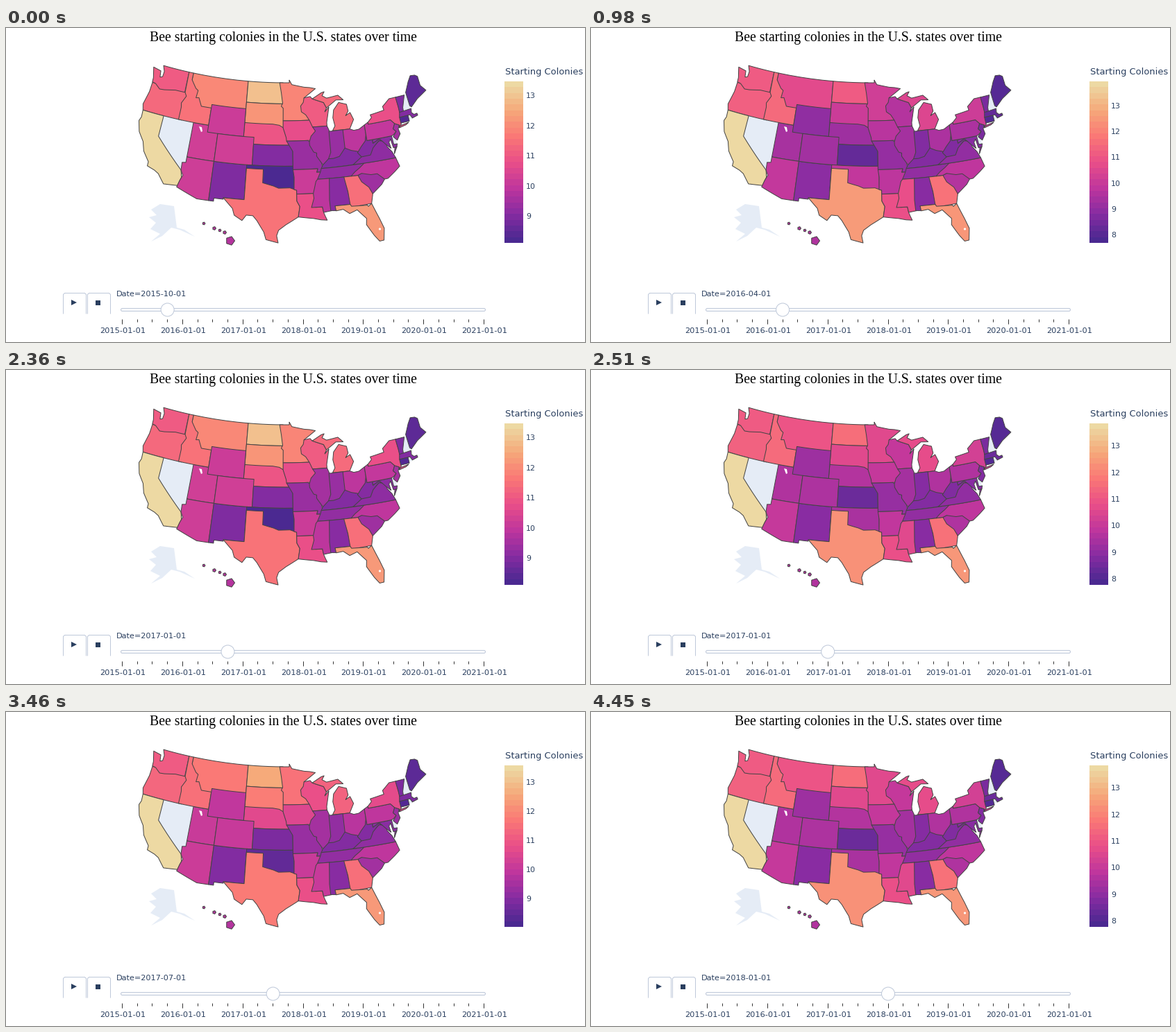
Animation of 834x453 px, one loop 4730 ms. Source, as a matplotlib script:

```python
import math

import matplotlib.pyplot as plt
import numpy as np
from matplotlib.animation import FuncAnimation
from matplotlib.collections import PolyCollection
from matplotlib.colors import LinearSegmentedColormap
from matplotlib.patches import Circle, FancyBboxPatch, Polygon

W, H, DPI = 834, 453, 72
LOOP_MS, STEP_MS = 4730, 22
MAP_TIMES = (0, 400, 980, 1410, 1990, 2510, 2910, 3460, 3890, 4450)
LABEL_TIMES = (0, 400, 830, 1410, 1840, 2360, 2910, 3340, 3890, 4450)
FIRST_QUARTER = 3  # 2015-10, counted from 2015-01
INK, BORDER, LAND = "#2a3f5f", "#bec8d9", "#e5ecf6"
SUNSET = LinearSegmentedColormap.from_list("sunset", [
    (r / 255, g / 255, b / 255) for r, g, b in (
        (75, 41, 145), (135, 44, 162), (192, 54, 157), (234, 79, 136),
        (250, 120, 118), (246, 169, 122), (237, 217, 163))])


def spring_share(quarter):
    """Yearly cycle, about 1 in spring and 0 in autumn, peaking in March."""
    return 0.5 + 0.7 * math.cos(math.pi / 2 * (quarter - 2 / 3))


def albers(lon_west, lat):
    """Conic equal-area projection to stage pixels."""
    s1, s2 = math.sin(math.radians(29.5)), math.sin(math.radians(45.5))
    n = (s1 + s2) / 2
    rho = np.sqrt(1 + s1 * s2 - 2 * n * np.sin(np.radians(lat))) / n
    theta = n * np.radians(96 - lon_west)
    return np.column_stack((402.4 + 573 * rho * np.sin(theta),
                            -552.4 + 573 * rho * np.cos(theta)))


def outline(*points):
    """Projected ring whose edges follow the parallels."""
    ring = np.array(points + points[:1], float)
    at = np.arange(0, len(ring) - 0.99, 0.2)
    corners = np.arange(len(ring))
    return albers(*(np.interp(at, corners, axis) for axis in ring.T))


def box(west, east, north, south):
    return (west, north), (east, north), (east, south), (west, south)


shapes, autumn, spring = [], [], []


def add_shape(levels, shape):
    shapes.append(shape)
    autumn.append(levels[0] / 100)
    spring.append(levels[1] / 100)


def state(in_autumn, in_spring, *points):
    add_shape((in_autumn, in_spring), outline(*points))


# Each state overlaps the ones before it, so most borders are given only once.
# Points are degrees west and north.

# West
state(60, 57, (124, 46.2), (119, 46.2), (116.4, 46), (116.4, 42), (124.2, 42),
      (124.55, 42.85), (124.05, 44.8))
state(55, 55, (124.7, 48.38), (123, 48.15), (122.8, 47.25), (122.3, 47.4), (122.25, 48.2),
      (122.75, 49), (117.03, 49), (117, 46), (118.98, 46), (121.2, 45.65), (122.2, 45.57),
      (123.3, 46.17), (124.05, 46.27), (124.1, 46.9))
state(100, 100, (124.2, 42), (120, 42), (120, 39), (114.63, 35), (114.3, 34),
      (114.72, 32.72), (117.12, 32.53), (118.4, 33.8), (119.2, 34.15), (120.6, 34.5),
      (120.6, 35.1), (121.9, 36.4), (122.5, 37.7), (123.7, 38.9), (124.35, 40.4), (124.1, 41))
state(70, 49, *box(116.05, 104.05, 49, 44.4))
state(38, 27, *box(114.04, 109.05, 42, 37))
state(64, 61, (117.03, 49), (116.05, 49), (116.05, 48), (114.9, 46.9), (114.35, 46.65),
      (114.5, 45.56), (113.9, 45.65), (113.1, 44.5), (111.05, 44.5), (111.05, 42),
      (117.03, 42), (117.03, 43.8), (117.2, 44.4), (116.5, 45.5), (116.92, 46))
state(38, 35, (114.04, 37), (109.05, 37), (109.05, 31.33), (111.07, 31.33), (114.8, 32.5),
      (114.5, 33.5), (114.14, 34.3), (114.63, 35), (114.7, 36.1), (114.04, 36.2))
state(15, 18, (109.05, 37), (103.04, 37), (103.04, 32), (106.6, 32), (106.6, 31.78),
      (108.2, 31.78), (108.2, 31.33), (109.05, 31.33))

# Plains
state(88, 58, *box(104.05, 96.5, 49, 45.94))
state(73, 41, *box(104.05, 96.4, 45.94, 42.5))
state(50, 26, (104.05, 43), (98.5, 43), (97.2, 42.85), (96.4, 42.5), (95.3, 40), (104.05, 40))
state(36, 21, *box(111.05, 104.05, 45, 41))
state(38, 26, *box(109.05, 102.05, 41, 37))
state(15, 8, *box(102.05, 94.61, 40, 37))
state(2, 31, *box(103.04, 94.43, 37, 33.64))
state(66, 77, (103.04, 36.5), (100, 36.5), (100, 34.56), (98.1, 34.15), (97.2, 33.85),
      (95.2, 33.9), (94.04, 33.55), (94.04, 32), (93.55, 31.2), (93.85, 29.7), (95.9, 28.6),
      (97.1, 27.8), (97.4, 27), (97.15, 25.96), (99.1, 26.4), (99.5, 27.5), (100.7, 29.1),
      (101.4, 29.77), (102.5, 29.8), (103.15, 28.98), (104.5, 29.65), (104.9, 30.6),
      (106.62, 32), (103.04, 32))

# Along the Mississippi
state(68, 42, (97.23, 49), (95.15, 49), (95.15, 49.38), (94.6, 48.72), (92, 48.3),
      (90.8, 48.2), (89.6, 48), (92.1, 46.75), (91.1, 43.5), (96.45, 43.5), (96.45, 45.3),
      (96.85, 45.6), (96.56, 46), (96.85, 47.5))
state(47, 33, (96.45, 43.5), (90.5, 43.5), (90, 41.5), (91, 40.6), (95.77, 40.59),
      (95.85, 41.1), (96.45, 42.49))
state(22, 21, (95.77, 40.59), (91.73, 40.61), (90.5, 40), (89.5, 38.5), (89.2, 36),
      (90.37, 36), (90.15, 36.5), (94.62, 36.5), (94.61, 39.1), (95.3, 40))
state(37, 33, (94.62, 36.5), (90.15, 36.5), (90.37, 36), (89.5, 36), (91, 33), (94.04, 33),
      (94.04, 33.55), (94.48, 33.64), (94.43, 35.4))
state(50, 50, (94.04, 33), (90.9, 33), (90.9, 31), (89.75, 31), (89.6, 30.2), (89.4, 29.7),
      (89.1, 29.05), (90.1, 29.15), (91.3, 29.4), (93.85, 29.7), (93.55, 31.2), (94.04, 32))
state(53, 32, (92.1, 46.75), (90.8, 46.9), (90.4, 46.55), (88.1, 45.9), (87.6, 45.1),
      (88, 44.55), (87.1, 45.2), (87.8, 43), (87.8, 42.5), (90.65, 42.5), (91.22, 43.5),
      (91.9, 44.3), (92.75, 44.75), (92.85, 45.6), (92.29, 46.1))
state(25, 25, (90.65, 42.5), (87.8, 42.5), (87.4, 41.7), (87.5, 38.2), (88, 37.3),
      (89.15, 37), (90.2, 38.3), (90.15, 38.75), (90.7, 38.9), (91.4, 39.9),
      (91.42, 40.38), (91.05, 41.2), (90.15, 41.9))

# Great Lakes and Ohio valley
state(60, 46, (90.4, 46.55), (88.4, 47.35), (87.8, 47.45), (88.3, 46.9), (87.4, 46.5),
      (85, 46.75), (84, 46), (85.5, 46.1), (87.6, 45.1), (88.1, 45.9))
state(60, 46, (86.8, 41.76), (86.25, 42.4), (86.5, 43.6), (86.2, 44.7), (85, 45.7),
      (83.45, 45.3), (83.3, 44.3), (83.9, 43.7), (82.95, 44.05), (82.45, 43), (83.45, 41.72))
state(21, 16, (87.53, 41.7), (84.7, 41.74), (84.7, 38.9), (86, 37.7), (88.05, 37.8),
      (87.53, 38.7))
state(32, 28, (84.81, 41.72), (83.45, 41.72), (82.7, 41.45), (81.7, 41.5), (80.52, 41.98),
      (80.52, 39.8), (82, 38.2), (84.81, 38.8))
state(16, 16, (89.15, 37), (88.05, 37.8), (87.1, 37.8), (86, 38), (84.82, 39.1),
      (83.7, 38.65), (82.6, 38.4), (81.9, 37.4), (83.5, 36.6), (89.5, 36.5))

# South
state(20, 20, (89.5, 36.5), (81.68, 36.59), (84, 35), (90.3, 35), (89.7, 36))
state(34, 48, (90.3, 35), (88.1, 35), (88.3, 30.35), (89.6, 30.2), (89.75, 31), (91.6, 31),
      (91.1, 32.3), (91.17, 33), (90.6, 34.7))
state(17, 17, (88.2, 35), (85.5, 35), (84.9, 31), (87.6, 31), (87.45, 30.3), (88.4, 30.37),
      (88.47, 31.9))
state(63, 64, (85.6, 35), (83, 35), (81.3, 33.1), (81, 32.08), (81.45, 30.72),
      (84.86, 30.6), (85.05, 31), (85.18, 32.87))
state(78, 77, (87.6, 31), (85.05, 31), (84.86, 30.71), (82.2, 30.57), (82.05, 30.38),
      (81.45, 30.72), (80.55, 28.4), (80.05, 26.9), (80.4, 25.2), (81.1, 25.15),
      (81.8, 26.1), (82.8, 27.8), (82.65, 28.7), (84, 30.1), (85.3, 29.7), (86.3, 30.4),
      (87.5, 30.28))
state(24, 29, (83.1, 35), (82.4, 35.2), (79.67, 35.2), (78.55, 33.86), (79.2, 33.2),
      (81, 32.08), (81.5, 33.1), (82.6, 34))
state(33, 33, (84.32, 35), (83.5, 35.57), (82.6, 36.03), (81.68, 36.59), (75.87, 36.55),
      (75.5, 35.25), (76.5, 34.65), (77.95, 33.87), (78.55, 33.86), (79.67, 34.8),
      (80.8, 34.82), (82.4, 35.2), (83.1, 35))
state(19, 20, (83.68, 36.6), (75.87, 36.55), (76.3, 37.5), (77, 38.35), (77.05, 38.85),
      (77.75, 39.3), (78.2, 39.4), (80, 38.5), (81.5, 37.6), (81.97, 37.54))
state(19, 20, (75.95, 37.15), (75.25, 38.03), (75.65, 37.95))
state(16, 15, (80.52, 40.63), (80.52, 39.72), (79.48, 39.72), (79.48, 39.2), (78.2, 39.65),
      (77.75, 39.3), (78.35, 39.4), (79.6, 38.55), (80.3, 37.6), (81.97, 37.54),
      (82.6, 38.2), (81.75, 39), (80.85, 39.7))
state(18, 17, (79.48, 39.72), (75.79, 39.72), (75.7, 38.46), (75.05, 38.45), (75.25, 38.03),
      (75.9, 38), (76.1, 39.3), (76.5, 38.9), (76.35, 38), (77.05, 38.6), (77.75, 39.3),
      (78.2, 39.65), (79.48, 39.2))

# Northeast
state(34, 28, (80.52, 41.98), (79.76, 42.27), (79.76, 42), (75.35, 42), (74.7, 41.35),
      (75.2, 40.65), (74.75, 40.2), (75.4, 39.8), (75.79, 39.72), (80.52, 39.72))
state(24, 14, (74.7, 41.35), (73.9, 41), (74.25, 40.5), (74.1, 39.75), (74.9, 38.95),
      (75.5, 39.55), (74.75, 40.2), (75.2, 40.65))
state(49, 39, (79.76, 42.27), (78.9, 42.85), (79.05, 43.27), (76.2, 43.55), (76.3, 44.1),
      (74.7, 45), (73.3, 45), (73.2, 42.7), (73.5, 41), (73.95, 40.75), (73.9, 41),
      (74.7, 41.35), (75.35, 42), (79.76, 42))
state(49, 39, (74, 40.6), (73.7, 40.87), (72, 41.05), (72.6, 40.8))
state(14, 13, (73.35, 45), (71.5, 45), (72.4, 43.3), (72.46, 42.73), (73.27, 42.75),
      (73.25, 43.5))
state(15, 8, (73.5, 42.04), (73.27, 42.75), (70.85, 42.87), (71, 42.3), (70.6, 41.95),
      (70, 42), (69.95, 41.7), (71.1, 41.5), (71.38, 42.04))
state(2, 2, *box(73.5, 71.8, 42.04, 41.2))
state(5, 3, (71.08, 45.3), (70, 46.7), (69.23, 47.46), (68.3, 47.36), (67.8, 47.07),
      (67.8, 45.7), (66.97, 44.8), (69.1, 44), (70.7, 43.07), (70.98, 43.3))

# Hawaii: small islands in stage pixels
turn = np.linspace(0, 2 * np.pi, 6)
for x, y, radius in ((285, 282, 2), (300, 289, 2.5), (308, 292, 2), (315, 295, 2.5),
                     (323, 307, 6.5)):
    add_shape((30, 29), np.column_stack((x + radius * np.cos(turn), y + radius * np.sin(turn))))

# Land without data: Nevada, New Hampshire, Delaware, Rhode Island, Alaska
bare_land = [outline(*box(*edges)) for edges in (
    (120, 114.04, 42, 35.2), (72.4, 70.9, 45, 42.8), (75.79, 75.1, 39.8, 38.45),
    (71.86, 71.2, 42, 41.4))]
bare_land.append([(222, 254), (242, 257), (246, 288), (257, 291), (272, 301), (250, 291),
                  (238, 288), (225, 300), (209, 308), (222, 297), (208, 290), (216, 281),
                  (206, 273), (217, 270), (209, 262)])

fig = plt.figure(figsize=(W / DPI, H / DPI), dpi=DPI, facecolor="white")
ax = fig.add_axes([0, 0, 1, 1])
ax.axis("off")


def label(x, y, text, size=11, font="DejaVu Sans", color=INK, ha="left"):
    return ax.text(x, y, text, size=size, family=font, color=color, ha=ha, va="baseline")


def flat(points, color, zorder=1):
    ax.add_patch(Polygon(points, fc=color, ec="none", zorder=zorder))


label(399, 19, "Bee starting colonies in the U.S. states over time", 19.7,
      "Liberation Serif", "black", "center")

# Map
ax.add_collection(PolyCollection(bare_land, facecolor=LAND, edgecolor="none"))
states = PolyCollection(shapes, edgecolor="#444444", linewidth=1, zorder=2)
ax.add_collection(states)
flat([(278, 142), (282, 143), (283, 149), (281, 150)], "white", 3)
ax.add_patch(Circle((538.5, 290), 1.6, fc="white", ec="none", zorder=3))

# Colour bar
BAR_TOP, BAR_BOTTOM = 77, 310
label(719, 67, "Starting Colonies", 13)
ax.imshow(np.linspace(1, 0, 28)[:, None], cmap=SUNSET, aspect="auto",
          interpolation="nearest", extent=(718, 745, BAR_BOTTOM, BAR_TOP))
ticks = {value: label(748.8, 0, str(value)) for value in range(8, 14)}

# Buttons
for left in (82.5, 117.5):
    right = left + 33
    ax.plot([left, left, left + 2, right - 2, right, right],
            [412, 384.5, 382.5, 382.5, 384.5, 412], color=BORDER, lw=1)
flat([(94, 392), (102, 396), (94, 400)], INK)
flat([(129.5, 393), (136.5, 393), (136.5, 400), (129.5, 400)], INK)

# Slider
SLIDER_X, SLIDER_STEP = 167.5, 21.71
ax.add_patch(FancyBboxPatch((165.5, 404.5), 525, 4, boxstyle="round,pad=0,rounding_size=2",
                            fc="#f8fafc", ec=BORDER, lw=1))
for quarter in range(25):
    x = math.floor(SLIDER_X + quarter * SLIDER_STEP) + 0.5
    year, part = divmod(quarter, 4)
    ax.plot([x, x], [420, 424 if part else 427], color="#333333", lw=1,
            solid_capstyle="butt")
    if not part:
        label(x + 0.7, 440, f"{2015 + year}-01-01", 11.35, ha="center")
grip = Circle((0, 406.5), 9.5, fc="white", ec=BORDER, lw=1, zorder=4)
ax.add_patch(grip)
date = label(159, 387, "", 11.2)
ax.set(xlim=(0, W), ylim=(H, 0))

autumn, spring = np.array(autumn), np.array(spring)


def quarter_at(times, now):
    return FIRST_QUARTER + np.searchsorted(times, now, side="right") - 1


def update(frame):
    now = (frame + 1) * STEP_MS - 1
    shown = quarter_at(MAP_TIMES, now)
    share = spring_share(shown)
    states.set_facecolor(SUNSET(np.clip(autumn + (spring - autumn) * share, 0, 1)))
    grip.center = (SLIDER_X + shown * SLIDER_STEP, 406.5)

    year, part = divmod(quarter_at(LABEL_TIMES, now), 4)
    date.set_text(f"Date={2015 + year}-{3 * part + 1:02d}-01")

    low, high = 8.07 - 0.37 * share, 13.5 + 0.4 * share
    for value, text in ticks.items():
        text.set_y(np.interp(value, (low, high), (BAR_BOTTOM, BAR_TOP)) + 4.3)
        text.set_visible(value > low)
    return states, grip, date, *ticks.values()


animation = FuncAnimation(fig, update, frames=LOOP_MS // STEP_MS, interval=STEP_MS,
                          init_func=lambda: update(0), repeat=True, repeat_delay=0)
plt.show()
```
